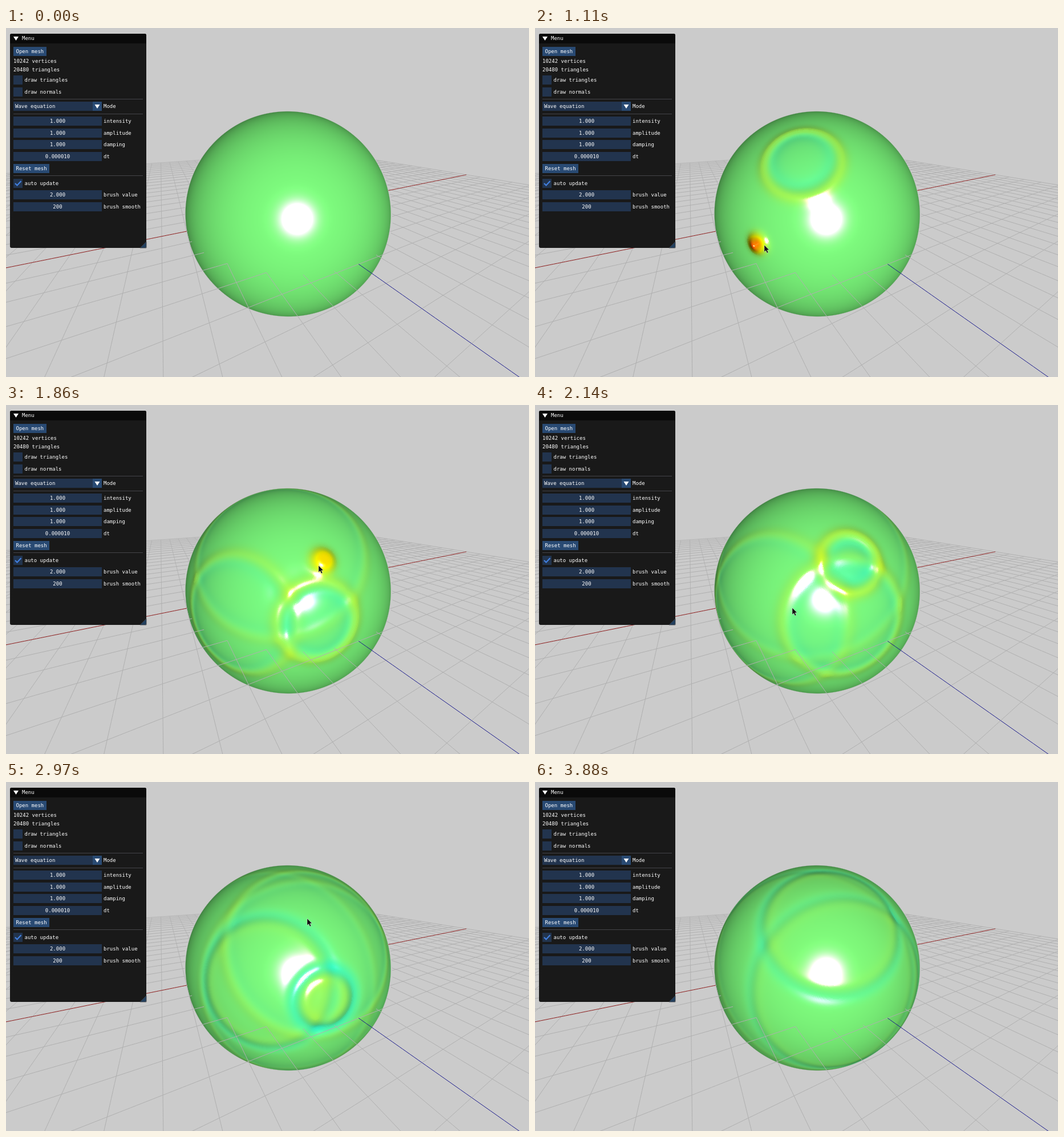
An HTML page with a canvas that plays this animation: 917x611 px, repeating every 3.95 s.

```html
<!DOCTYPE html>
<html lang="en">
<head>
<meta charset="utf-8">
<title>Wave equation on a sphere</title>
<style>
  html, body { margin: 0; width: 100%; height: 100%; overflow: hidden; background: #cbcbcb; }
  canvas { display: block; }
</style>
</head>
<body>
<canvas id="stage" width="917" height="611"></canvas>
<script>
const W = 917, H = 611, LOOP = 3950, STEP = 69.3;
const ctx = document.getElementById('stage').getContext('2d');

function layer(w, h) {
  const c = document.createElement('canvas');
  c.width = w; c.height = h;
  return c.getContext('2d');
}

// Camera space: x right, y down, z forward; unit sphere at O
const F = 358, CX = W / 2, CY = H / 2, O = [.1797, .0995, 2.227];
const OO = O[0] ** 2 + O[1] ** 2 + O[2] ** 2;
const PITCH = 20.8 * Math.PI / 180, YAW = 63.9 * Math.PI / 180;
const sp = Math.sin(PITCH), cp = Math.cos(PITCH), sy = Math.sin(YAW), cy = Math.cos(YAW);
const AXIS_X = [sy, -cy * sp, cy * cp], AXIS_Z = [cy, sy * sp, -sy * cp];

// Normal where the ray through a pixel meets a sphere of radius r
function hit(px, py, r = 1) {
  const x = (px - CX) / F, y = (py - CY) / F;
  const a = x * x + y * y + 1, b = x * O[0] + y * O[1] + O[2];
  const disc = b * b - a * (OO - r * r);
  if (disc <= 0) return null;
  const t = (b - Math.sqrt(disc)) / a;
  return [(x * t - O[0]) / r, (y * t - O[1]) / r, (t - O[2]) / r, disc];
}

// Grid
const grid = layer(W, H);
function planeLine(point, color) {
  grid.strokeStyle = color;
  grid.beginPath();
  let pen = false;
  for (let k = -200; k <= 200; k++) {
    const [u, v] = point(k * .02);
    const [x, y, z] = O.map((o, i) => o + u * AXIS_X[i] + v * AXIS_Z[i]);
    const a = x * x + y * y + z * z, b = x * O[0] + y * O[1] + z * O[2];
    const disc = b * b - a * (OO - 1);
    const hidden = z < .12 || disc > 0 && (b - Math.sqrt(disc)) / a < 1;
    if (!hidden) grid[pen ? 'lineTo' : 'moveTo'](CX + F * x / z, CY + F * y / z);
    pen = !hidden;
  }
  grid.stroke();
}
for (let i = -20; i <= 20; i++) {
  if (!i) continue;
  planeLine(s => [i * .2, s], '#afafaf');
  planeLine(s => [s, i * .2], '#afafaf');
}
planeLine(s => [s, 0], '#8c1c1c');
planeLine(s => [0, s], '#1c1c8c');

// Radial wave from a Gaussian bump, one row per time step
const CELLS = 500, ROWS = 620, DT = Math.PI / CELLS, SPEED = .55, SIGMA = .037;
const wave = [];
{
  let prev, now = Float32Array.from({ length: CELLS }, (_, i) => Math.exp(-(((i + .5) * DT / SIGMA) ** 2) / 2));
  prev = now;
  for (let r = 0; r < ROWS; r++) {
    wave.push(now);
    const next = new Float32Array(CELLS);
    for (let i = 0; i < CELLS; i++) {
      const up = i < CELLS - 1 ? Math.sin((i + 1) * DT) * (now[i + 1] - now[i]) : 0;
      const down = i ? Math.sin(i * DT) * (now[i] - now[i - 1]) : 0;
      const acc = (up - down) / Math.sin((i + .5) * DT);
      next[i] = now[i] + (now[i] - prev[i]) * (r ? 1 : 0) + acc * (r ? .25 : .125);
    }
    prev = now; now = next;
  }
}

// Brush dabs: time, x, y, sign
const dabs = [
  [660, 466, 228, 1], [1080, 390, 377, 1], [1415, 550, 383, 1], [1815, 555, 273, 1],
  [2165, 447, 360, -1], [2630, 562, 383, -1], [2990, 526, 237, -1]
].map(([t, x, y, sign]) => ({ t, sign, n: hit(x, y) }));

let active = [], height, gx, gy, gz;
function sample(x, y, z) {
  height = gx = gy = gz = 0;
  for (const p of active) {
    const c = x * p.n[0] + y * p.n[1] + z * p.n[2];
    if (c < p.limit) continue;
    const angle = Math.acos(Math.min(1, c));
    const f = Math.max(0, angle / DT - .5), i = Math.min(CELLS - 2, f | 0);
    const a = p.row[i], slope = p.row[i + 1] - a;
    height += p.gain * (a + slope * (f - i));
    const g = p.gain * slope / DT / Math.max(.004, Math.sin(angle));
    gx += g * (x * c - p.n[0]);
    gy += g * (y * c - p.n[1]);
    gz += g * (z * c - p.n[2]);
  }
}

// Sphere
const SX = 312, SY = 143, SIZE = 366, LIFT = .075;
const ball = layer(SIZE, SIZE), image = ball.createImageData(SIZE, SIZE);
const pixels = [];
for (let j = 0; j < SIZE; j++) for (let i = 0; i < SIZE; i++) {
  const n = hit(SX + i + .5, SY + j + .5);
  if (n) pixels.push({ n, x: SX + i + .5, y: SY + j + .5, at: 4 * (j * SIZE + i) });
}
const jet = (v, c) => Math.max(0, Math.min(1, 1.5 - Math.abs(4 * v - c)));

function drawBall(t) {
  active = dabs.filter(p => t >= p.t);
  for (const p of active) {
    const age = (t - p.t) / 1000, reach = age * SPEED;
    p.row = wave[Math.min(ROWS - 1, Math.round(reach / DT * 2))];
    p.gain = p.sign * Math.exp(-.7 * age);
    p.limit = Math.cos(Math.min(Math.PI, reach + .16));
  }
  const data = image.data;
  for (const { n, x, y, at } of pixels) {
    let m = n;
    sample(m[0], m[1], m[2]);
    for (let k = 0; k < 2 && Math.abs(height) > .08; k++) {
      m = hit(x, y, 1 + LIFT * height) || n;
      sample(m[0], m[1], m[2]);
    }
    const r = 1 + LIFT * height;
    const nx = m[0] * r - LIFT * gx, ny = m[1] * r - LIFT * gy, nz = m[2] * r - LIFT * gz;
    const facing = Math.max(0, -nz / Math.sqrt(nx * nx + ny * ny + nz * nz));
    const light = .1 + .9 * facing, shine = 1.35 * facing ** 230, v = .5 + .36 * height;
    data[at] = 255 * (jet(v, 3) * light + shine);
    data[at + 1] = 255 * (jet(v, 2) * light + shine);
    data[at + 2] = 255 * (jet(v, 1) * light + shine);
    data[at + 3] = 255 * Math.min(1, n[3] / .0135);
  }
  ball.putImageData(image, 0, 0);
}

// Menu panel
const panel = layer(W, H);
const FRAME = '#22344e', BUTTON = '#294a73';
function box(x, y, w, h, color) {
  panel.fillStyle = color;
  panel.fillRect(x, y, w, h);
}
function shape(c, points, color) {
  c.fillStyle = color;
  c.beginPath();
  points.forEach(([x, y]) => c.lineTo(x, y));
  c.closePath();
  c.fill();
}
function label(text, x, y, align = 'left') {
  panel.fillStyle = '#fff';
  panel.textAlign = align;
  panel.fillText(text, x, y);
}
function button(text, y, w) {
  box(13, y - 8, w, 16, BUTTON);
  label(text, 17.5, y + .5);
}
function check(text, y) {
  box(13, y - 8, 16, 16, FRAME);
  label(text, 32.5, y + .5);
}
function slider(value, text, y) {
  box(13, y - 8, 155, 16, FRAME);
  label(value, 90.5, y + .5, 'center');
  label(text, 171, y + .5);
}
const arrowDown = (x, y) => shape(panel, [[x - 4.5, y - 3], [x + 4.5, y - 3], [x, y + 4]], '#fff');

panel.font = '9px "DejaVu Sans Mono", "Liberation Mono", monospace';
panel.textBaseline = 'middle';
panel.beginPath();
panel.roundRect(7, 10, 239, 375, 3);
panel.fillStyle = '#191919';
panel.fill();
panel.save();
panel.clip();
box(7, 10, 239, 17, '#0a0a0a');
shape(panel, [[246, 374], [246, 385], [235, 385]], '#22405f');
panel.restore();
panel.strokeStyle = '#3a3a3e';
panel.lineWidth = .8;
panel.stroke();
arrowDown(17.5, 18);
label('Menu', 28, 19);
button('Open mesh', 41, 58);
label('10242 vertices', 13, 59);
label('20480 triangles', 13, 73.5);
check('draw triangles', 91);
check('draw normals', 112);
slider('', 'Mode', 137);
label('Wave equation', 16, 137.5);
box(152, 129, 16, 16, BUTTON);
arrowDown(160, 137);
slider('1.000', 'intensity', 163);
slider('1.000', 'amplitude', 184);
slider('1.000', 'damping', 204);
slider('0.000010', 'dt', 225);
button('Reset mesh', 246, 63);
check('auto update', 272);
slider('2.000', 'brush value', 292);
slider('200', 'brush smooth', 313);
for (const y of [124, 150, 258]) box(13, y, 227, 1, '#444449');
panel.strokeStyle = '#4280e0';
panel.lineWidth = 2.2;
panel.beginPath();
panel.moveTo(16, 272);
panel.lineTo(19.5, 275.5);
panel.lineTo(26.5, 268);
panel.stroke();

// Pointer path: time, x, y
const path = [
  [70, 817, 537], [300, 600, 350], [520, 451, 215], [660, 464, 226], [820, 434, 300], [960, 394, 408],
  [1040, 388, 377], [1110, 402, 380], [1370, 550, 378], [1460, 553, 384], [1770, 555, 272],
  [1860, 552, 278], [2140, 451, 355], [2240, 448, 360], [2600, 560, 382], [2690, 556, 365],
  [2930, 526, 236], [3040, 530, 243], [3250, 668, 472], [3326, 830, 579]
];
function drawPointer(t) {
  const i = path.findIndex((p, k) => k && t <= p[0]);
  if (t < 60 || i < 0) return;
  const [t0, x0, y0] = path[i - 1], [t1, x1, y1] = path[i];
  const k = Math.max(0, (t - t0) / (t1 - t0));
  ctx.save();
  ctx.translate(Math.round(x0 + (x1 - x0) * k), Math.round(y0 + (y1 - y0) * k));
  shape(ctx, [[0, 0], [0, 12], [2.8, 9.6], [4.8, 14], [7, 13], [5, 8.8], [8.6, 8.6]], '#111');
  ctx.strokeStyle = 'rgba(255,255,255,.6)';
  ctx.lineWidth = .7;
  ctx.stroke();
  ctx.restore();
}

function draw(t) {
  ctx.fillStyle = '#cbcbcb';
  ctx.fillRect(0, 0, W, H);
  drawBall(t);
  ctx.drawImage(ball.canvas, SX, SY);
  ctx.drawImage(grid.canvas, 0, 0);
  ctx.drawImage(panel.canvas, 0, 0);
  drawPointer(t);
}

const start = performance.now();
let shown = -1;
function tick() {
  const t = (performance.now() - start) % LOOP;
  const step = Math.min(56, Math.floor(t / STEP + .2));
  if (step !== shown) draw((shown = step) * STEP);
  requestAnimationFrame(tick);
}
tick();
</script>
</body>
</html>
```
